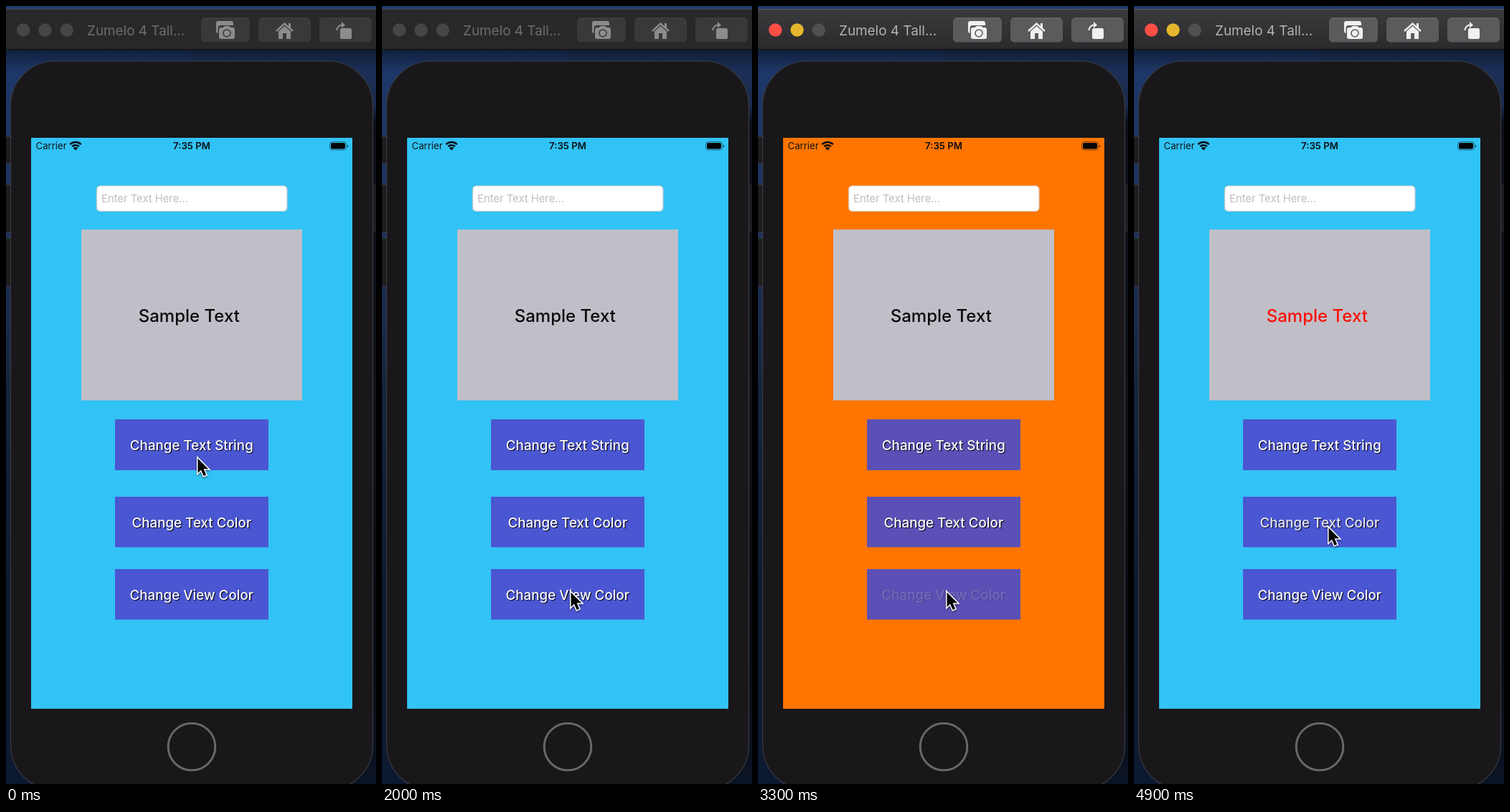
Recreate the animation shown at these times as an HTML page with a canvas. Size 516 by 1086 pixels, loop 5 s.

```html
<!DOCTYPE html>
<html lang="en">
<head>
<meta charset="utf-8">
<style>
  html, body { margin: 0; width: 100%; height: 100%; overflow: hidden; background: #10182b; }
  canvas { display: block; }
</style>
</head>
<body>
<canvas id="stage" width="516" height="1086"></canvas>
<script>
const ctx = document.getElementById('stage').getContext('2d');
const LOOP = 5000, STEP = 100;
const TAU = Math.PI * 2;

const BLUE = '#32c3f6', ORANGE = '#ff7500';
const BUTTONS = [
  { label: 'Change Text String', y: 577 },
  { label: 'Change Text Color', y: 685 },
  { label: 'Change View Color', y: 786 },
];
const PRESSES = [
  { button: 2, down: 2300, up: 2500 },
  { button: 2, down: 3100, up: 3300 },
  { button: 1, down: 4400, up: 4600 },
];
// Pointer tip: time, x, y
const PATH = [
  [0, 267, 630], [1200, 267, 630], [1400, 271, 655], [2000, 263, 817],
  [3500, 263, 817], [3900, 271, 727], [LOOP, 271, 727],
];

function box(x, y, w, h, fill, r = 0) {
  ctx.beginPath();
  ctx.roundRect(x, y, w, h, r);
  ctx.fillStyle = fill;
  ctx.fill();
}

function outline(color, width = 1) {
  ctx.strokeStyle = color;
  ctx.lineWidth = width;
  ctx.stroke();
}

function disc(x, y, r, fill) {
  ctx.beginPath();
  ctx.arc(x, y, r, 0, TAU);
  ctx.fillStyle = fill;
  ctx.fill();
}

function poly(points, fill) {
  ctx.beginPath();
  points.forEach(([x, y]) => ctx.lineTo(x, y));
  ctx.closePath();
  ctx.fillStyle = fill;
  ctx.fill();
}

function text(str, x, y, size, weight, fill, align = 'left') {
  ctx.font = `${weight} ${size}px Inter, sans-serif`;
  ctx.textAlign = align;
  ctx.fillStyle = fill;
  ctx.fillText(str, x, y);
}

function vertical(y0, y1, ...stops) {
  const g = ctx.createLinearGradient(0, y0, 0, y1);
  stops.forEach(([at, color]) => g.addColorStop(at, color));
  return g;
}

function drawDesktop() {
  box(0, 0, 258, 1086, vertical(0, 1086,
    [0, '#213d70'], [0.09, '#1d3767'], [0.34, '#1a3157'],
    [0.5, '#14243d'], [0.75, '#0e1a2f'], [1, '#0c1a31']));
  box(258, 0, 258, 1086, vertical(0, 1086,
    [0, '#213d70'], [0.08, '#1b3059'], [0.13, '#1a2a4c'], [0.15, '#0d1017'],
    [0.5, '#101319'], [0.8, '#090c12'], [1, '#0b1426']));
  box(0, 61, 516, 32, vertical(61, 93, [0, 'rgba(0,0,0,.45)'], [1, 'rgba(0,0,0,0)']));
}

function drawCamera(color, gap) {
  box(293, 21, 24, 17, color, 3);
  box(295.5, 27, 26, 21, gap, 4);
  box(297, 30, 22, 16, color, 3);
  box(303, 28, 10, 5, color, 2);
  ctx.beginPath();
  ctx.arc(308, 38, 5, 0, TAU);
  outline(gap, 1.6);
}

function drawHouse(color, gap) {
  ctx.beginPath();
  ctx.moveTo(377, 35);
  ctx.lineTo(388.5, 24.5);
  ctx.lineTo(400, 35);
  ctx.lineJoin = 'miter';
  outline(color, 2.4);
  box(394, 24, 3, 7, color);
  poly([[380, 35.5], [388.5, 28], [397, 35.5], [397, 46], [380, 46]], color);
  box(386, 38, 5, 8, gap);
}

function drawRotate(color) {
  box(466, 31, 16, 15, color, 2.5);
  ctx.beginPath();
  ctx.arc(469, 34, 7.5, Math.PI, Math.PI * 1.5);
  outline(color, 2);
  poly([[468, 22], [473, 26.5], [468, 31]], color);
}

function drawTitleBar(active) {
  const bar = active
    ? vertical(4, 61, [0, '#3b3a3d'], [1, '#2a292c'])
    : '#28282a';
  const icon = active ? '#f0f0f1' : '#8c8c8e';
  const button = active ? '#5b5b5e' : '#39393b';
  box(0, 4, 516, 57, bar);
  box(0, 4, 516, 1, active ? '#59595b' : '#444446');
  box(0, 60, 516, 1.5, '#111113');

  const lights = active ? ['#fe4e46', '#e5b62b', '#505052'] : Array(3).fill('#464648');
  lights.forEach((color, i) => disc(24.2 + i * 30.3, 33.5, 9.2, color));
  text('Zumelo 4 Tall...', 113, 41, 18.9, 400, active ? '#b2b2b4' : '#6c6c6e');

  [[272, 68], [352, 73], [437, 73]].forEach(([x, w]) => {
    box(x, 16.5, w, 34, button, 5);
    box(x + 3, 16.5, w - 6, 1, active ? '#707072' : '#454547');
  });
  drawCamera(icon, button);
  drawHouse(icon, button);
  drawRotate(icon);
}

function drawPhone() {
  [[0, 182, 38], [0, 249, 67], [0, 324, 68], [508, 250, 66]].forEach(([x, y, h]) => {
    box(x - 0.5, y + 0.5, 9, h - 1, '#1d1c1f', 2);
    outline('#333336');
  });
  box(6.5, 77, 505, 1017, '#19171a', 62);
  outline('#3c3a3e', 1.2);
  ctx.beginPath();
  ctx.arc(259, 1034, 32.8, 0, TAU);
  outline('#69676a', 3);
}

function drawStatus() {
  text('Carrier', 41.5, 200, 13.2, 400, '#101417');
  text('7:35 PM', 259, 200, 13.2, 600, '#0b0d0f', 'center');

  [12, 7.8].forEach(r => {
    ctx.beginPath();
    ctx.arc(97, 201, r - 1, -Math.PI * 0.75, -Math.PI * 0.25);
    outline('#0b0d0f', 2.5);
  });
  ctx.beginPath();
  ctx.moveTo(97, 201.5);
  ctx.arc(97, 201.5, 4.6, -Math.PI * 0.75, -Math.PI * 0.25);
  ctx.fillStyle = '#0b0d0f';
  ctx.fill();

  ctx.beginPath();
  ctx.roundRect(451.5, 189.5, 23, 11.5, 3.5);
  outline('rgba(0,0,0,.45)');
  box(453, 191, 20, 8.5, '#060708', 2);
  box(475.7, 193.5, 1.5, 4, 'rgba(0,0,0,.5)', 1);
}

function drawButton({ label, y }, fill, alpha) {
  const h = y === 577 ? 71 : 70.5;
  box(152, y, 214, h, fill);
  ctx.save();
  ctx.globalAlpha = alpha;
  ctx.shadowColor = 'rgba(0,0,0,.9)';
  ctx.shadowOffsetX = ctx.shadowOffsetY = 1.2;
  ctx.shadowBlur = 1;
  text(label, 258.8, y + 42.5, 18.8, 500, '#fff', 'center');
  ctx.restore();
}

function labelAlpha(button, t) {
  const press = PRESSES.filter(p => p.button === button && t >= p.down).pop();
  if (!press) return 1;
  return Math.min(1, 0.18 + 0.82 * Math.max(0, t - press.up) / 350);
}

function drawScreen(t) {
  const orange = t >= 2600 && t < 3400;
  box(35, 184, 448, 797, orange ? ORANGE : BLUE);
  drawStatus();

  box(126.5, 251, 265.5, 35.5, '#fff', 5);
  outline(orange ? '#d9c5b3' : '#b9c9d0', 1.2);
  text('Enter Text Here...', 133, 273.5, 14.8, 400, '#bebec1');

  box(105, 312, 308, 238.5, '#c0bfc7');
  text('Sample Text', 255.3, 440.5, 24, 500, t >= 4700 ? '#fa1007' : '#09090a', 'center');

  const fill = orange ? '#5b50b5' : '#4b56d2';
  BUTTONS.forEach((button, i) => drawButton(button, fill, labelAlpha(i, t)));
}

function pointerAt(t) {
  const i = PATH.findIndex(([time]) => time > t);
  const [t0, x0, y0] = PATH[i - 1], [t1, x1, y1] = PATH[i];
  const u = (t - t0) / (t1 - t0);
  const k = u * u * (3 - 2 * u);
  return [x0 + (x1 - x0) * k, y0 + (y1 - y0) * k];
}

function drawPointer(t) {
  const [x, y] = pointerAt(t);
  const shape = [[0.5, 1.5], [0.5, 22], [5, 17.7], [8.6, 26], [12.2, 24.4], [8.7, 16.3], [15.2, 16.3]];
  ctx.save();
  ctx.translate(x, y);
  ctx.lineJoin = 'miter';
  ctx.shadowColor = 'rgba(0,0,0,.4)';
  ctx.shadowBlur = 3;
  ctx.shadowOffsetY = 1.5;
  poly(shape, '#fff');
  outline('#fff', 3);
  ctx.shadowColor = 'transparent';
  poly(shape, '#050505');
  ctx.restore();
}

function frame(now) {
  const t = Math.floor((now % LOOP) / STEP) * STEP;
  drawDesktop();
  drawPhone();
  drawTitleBar(t >= 2200);
  drawScreen(t);
  drawPointer(t);
  requestAnimationFrame(frame);
}
requestAnimationFrame(frame);
</script>
</body>
</html>
```
